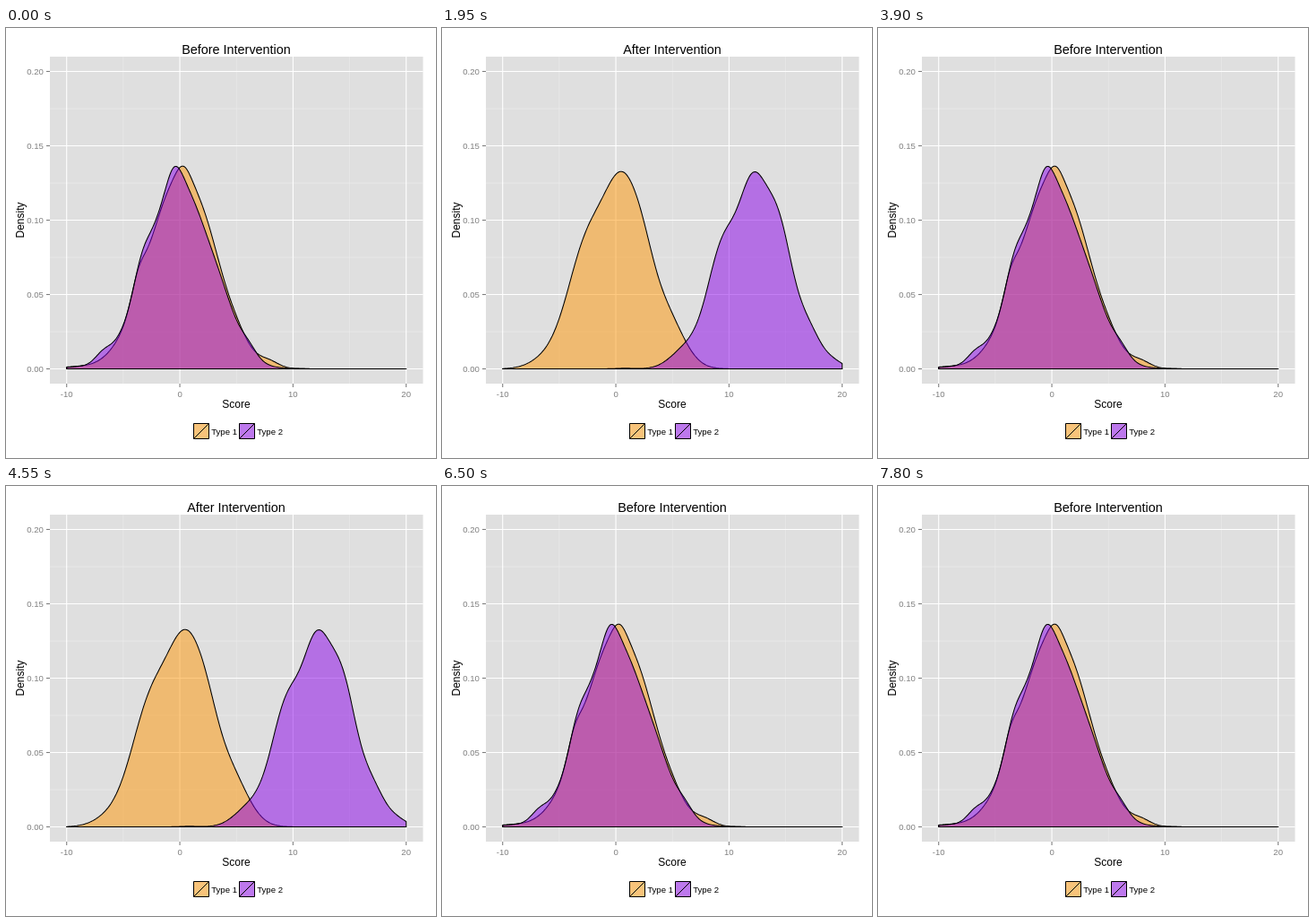
These frames come from a looping animation (480 px wide and 480 px high, 8 s). An HTML page:

```html
<!DOCTYPE html>
<html lang="en">
<head>
<meta charset="utf-8">
<title>Score density</title>
<style>
  html, body { margin: 0; width: 100%; height: 100%; overflow: hidden; background: #fff; }
  svg { display: block; width: 100vw; height: 100vh; }
  text { font-family: "Liberation Sans", Arial, sans-serif; text-anchor: middle; }
  .small { font-size: 9.6px; }
  .axis { font-size: 12px; }
  .tick { fill: #7f7f7f; }
  .curve, .key { stroke: #000; stroke-width: 1.05; fill-opacity: .5; stroke-linejoin: round; }
  .key { stroke-width: 1; }
</style>
</head>
<body>
<svg id="stage" viewBox="0 0 480 480"></svg>
<script>
const STEP = 650;
const LOOP = 8000;
const MIN = -10, MAX = 20;
const COLORS = ["#ff9505", "#8900e9"];
const stage = document.getElementById("stage");

const sx = v => 194.05 + v * 12.633;
const sy = v => 380.5 - v * 1660;

// Each density is a sum of bell curves: height, centre, spread.
const scenes = [
  {
    title: "Before Intervention",
    curves: [
      [[.129, .1, 2.9], [.012, -3.7, .6], [.007, .3, .6], [.0065, 2.7, 1.1],
       [.004, 5, .9], [.003, 7.9, .8], [.001, -9.5, 1.2]],
      [[.125, -.1, 2.85], [.005, -6.8, .7], [.013, -3.4, .7], [.012, -.5, .65],
       [.0095, 3.9, 1.2], [.0055, 6.1, .7], [.0008, -9.5, 1]]
    ]
  },
  {
    title: "After Intervention",
    curves: [
      [[.005, -6.3, 1.4], [.078, -2.6, 1.75], [.113, .7, 1.65], [.016, 2.5, 1],
       [.036, 4.3, 1.6]],
      [[.0004, .8, .8], [.0135, 6.3, 1.4], [.08, 9.5, 1.4], [.1015, 12.1, 1.2],
       [.0885, 14.4, 1.25], [.0242, 17, 1.1], [.0045, 19.2, .9]]
    ]
  }
];

const density = (bells, x) => bells.reduce(
  (sum, [height, centre, spread]) => sum + height * Math.exp(-(((x - centre) / spread) ** 2) / 2), 0);

function areaPath(bells) {
  let d = `M${sx(MIN)} ${sy(0)}`;
  for (let i = 0; i <= 300; i++) {
    const x = MIN + (MAX - MIN) * i / 300;
    d += `L${sx(x).toFixed(2)} ${sy(density(bells, x)).toFixed(2)}`;
  }
  return d + `L${sx(MAX)} ${sy(0)}Z`;
}

function add(name, attrs, text) {
  const el = document.createElementNS("http://www.w3.org/2000/svg", name);
  for (const key in attrs) el.setAttribute(key, attrs[key]);
  if (text) el.textContent = text;
  return stage.appendChild(el);
}

const line = (x1, y1, x2, y2, stroke, width) =>
  add("line", { x1, y1, x2, y2, stroke, "stroke-width": width });
const gridX = (v, color, width) => line(sx(v), 32, sx(v), 397, color, width);
const gridY = (v, color, width) => line(49, sy(v), 465.5, sy(v), color, width);

function drawPanel() {
  add("rect", { x: 49, y: 32, width: 416.5, height: 365, fill: "#dfdfdf" });
  for (let v = -5; v < MAX; v += 10) gridX(v, "#ececec", .6);
  for (let i = 0; i < 4; i++) gridY(.025 + i * .05, "#ececec", .6);
  for (let v = MIN; v <= MAX; v += 10) {
    gridX(v, "#fff", 1.1);
    line(sx(v), 397, sx(v), 401, "#7f7f7f", 1.1);
    add("text", { x: sx(v), y: 412, class: "small tick" }, String(v));
  }
  for (let i = 0; i <= 4; i++) {
    const v = i * .05;
    gridY(v, "#fff", 1.1);
    line(45, sy(v), 49, sy(v), "#7f7f7f", 1.1);
    add("text", { x: 32.5, y: sy(v) + 3.5, class: "small tick" }, v.toFixed(2));
  }
  add("text", { x: 257, y: 424, class: "axis" }, "Score");
  add("text", { transform: "translate(19.5 214.5) rotate(-90)", class: "axis" }, "Density");
}

function drawLegend() {
  const y = 441.5, size = 17;
  COLORS.forEach((fill, i) => {
    const x = 209.5 + i * 51;
    add("rect", { x, y, width: size, height: size, fill: "#f2f2f2" });
    add("rect", { x, y, width: size, height: size, fill, class: "key" });
    line(x, y + size, x + size, y, "#000", 1);
    add("text", { x: x + 34.1, y: 454, class: "small" }, `Type ${i + 1}`);
  });
}

drawPanel();
const title = add("text", { x: 257, y: 29, "font-size": 14.4 });
const areas = COLORS.map(fill => add("path", { fill, class: "curve" }));
drawLegend();
for (const scene of scenes) scene.paths = scene.curves.map(areaPath);

let shown = -1;
function render(time) {
  const index = Math.floor((time % LOOP) / STEP) % 2;
  if (index === shown) return;
  shown = index;
  title.textContent = scenes[index].title;
  areas.forEach((area, i) => area.setAttribute("d", scenes[index].paths[i]));
}

const start = performance.now();
function tick(now) {
  render(Math.max(0, now - start));
  requestAnimationFrame(tick);
}
render(0);
requestAnimationFrame(tick);
</script>
</body>
</html>
```
